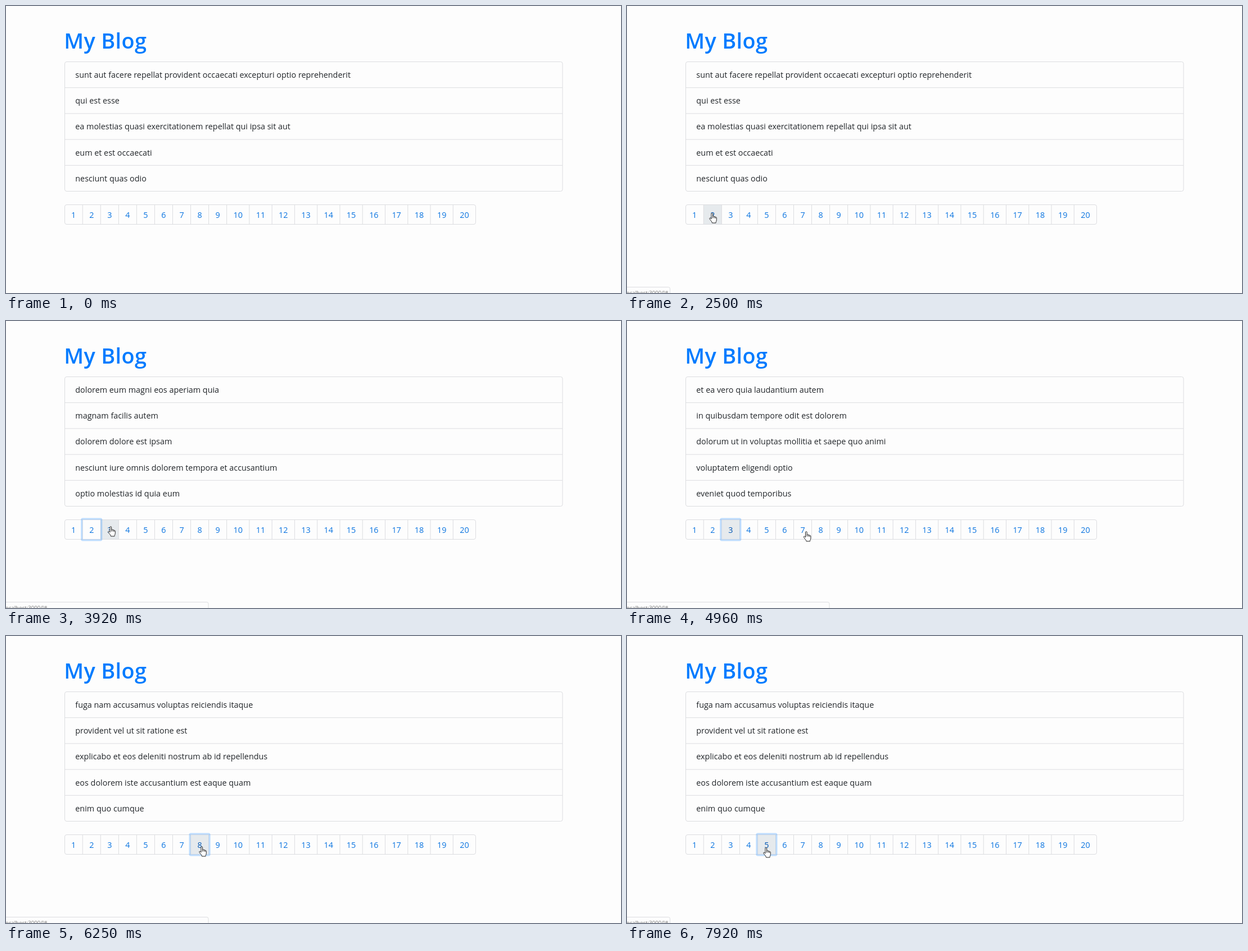
An HTML page for the animation above (8000 ms loop, 1094 px wide and 512 px high).

```html
<!DOCTYPE html>
<html lang="en">
<head>
<meta charset="utf-8">
<title>My Blog</title>
<style>
  html, body { margin: 0; height: 100%; overflow: hidden; background: #fdfdfd; }
  svg { display: block; width: 100vw; height: 100vh; }
  text { font: 14.37px "Open Sans", "Noto Sans", sans-serif; fill: #212529; }
  .title { font-size: 37.8px; font-weight: 600; letter-spacing: .35px; fill: #007bff; }
  .line { fill: none; stroke: #dcdde0; }
  .num { text-anchor: middle; fill: #0a74e0; }
  .num.on { fill: #0056b3; }
  #hover { fill: #e6eaed; }
  #ring { fill: none; stroke: #007bff; stroke-opacity: .25; stroke-width: 3; }
  #status rect { fill: #fdfdfd; stroke: #dcdde0; }
  #status text { font-size: 9.6px; text-anchor: end; fill: #777; }
  #cursor path { fill: #fff; stroke: #222; stroke-linejoin: round; }
</style>
</head>
<body>
<svg viewBox="0 0 1094 512">
  <text class="title" x="103.3" y="76">My Blog</text>
  <rect class="line" x="104.5" y="99.5" width="885.5" height="231" rx="3.5"/>
  <g id="list"></g>
  <rect id="hover" y="355" height="34.5"/>
  <rect class="line" x="104.5" y="354.5" width="731" height="35" rx="3.5"/>
  <g id="pager"></g>
  <rect id="ring" y="353" height="38" rx="1.5"/>
  <g id="status">
    <rect x="-5" y="501.5" height="20" rx="3"/>
    <text x="73.5" y="514.5">localhost:3000/!#</text>
  </g>
  <g id="cursor">
    <path id="hand" d="M4 11V1.8C4 .2 6.6 .2 6.6 1.8V6.5C7 5.4 9 5.6 9.1 6.8C9.6 6.2 11.2 6.5 11.3 7.6C12 7.2 13.3 7.6 13.3 8.8V12.5C13.3 15 12 15.6 12 18H5.5C5.3 15.5 3 14 1.2 11.2C0 9.4 1.8 8.4 2.8 9.6ZM6.6 6.5V9.5M9.1 6.8V9.5M11.3 7.6V10"/>
    <path id="arrow" d="M5 0V14.5L8.3 11.5 10.5 16.5 12.6 15.5 10.4 10.8H15Z"/>
  </g>
</svg>
<script>
const LOOP = 8000, HOVER_LAG = 60, CELLS = 20;

const pages = {
  1: ["sunt aut facere repellat provident occaecati excepturi optio reprehenderit", "qui est esse",
      "ea molestias quasi exercitationem repellat qui ipsa sit aut", "eum et est occaecati", "nesciunt quas odio"],
  2: ["dolorem eum magni eos aperiam quia", "magnam facilis autem", "dolorem dolore est ipsam",
      "nesciunt iure omnis dolorem tempora et accusantium", "optio molestias id quia eum"],
  3: ["et ea vero quia laudantium autem", "in quibusdam tempore odit est dolorem",
      "dolorum ut in voluptas mollitia et saepe quo animi", "voluptatem eligendi optio", "eveniet quod temporibus"],
  8: ["fuga nam accusamus voluptas reiciendis itaque", "provident vel ut sit ratione est",
      "explicabo et eos deleniti nostrum ab id repellendus", "eos dolorem iste accusantium est eaque quam", "enim quo cumque"]
};

// [time, value]
const shownPage = [[0, 1], [3000, 2], [4590, 3], [6130, 8]];
const focused = [[0, 0], [2840, 2], [4540, 3], [6040, 8], [7830, 5]];

// [time, x, y]
const path = [
  [0, 205, 520], [880, 205, 520], [1300, 150, 368], [1420, 148, 367], [1670, 146, 369],
  [3750, 146, 369], [3880, 181, 366], [4900, 181, 366], [4960, 313.5, 375], [5540, 320, 374],
  [5670, 341, 373], [6000, 341, 373], [6200, 343, 375], [6670, 343, 375], [6900, 322, 402],
  [7150, 262, 400], [7340, 243, 378], [7790, 243, 378], [7900, 242, 377], [LOOP, 242, 377]
];

const $ = id => document.getElementById(id);

function add(parent, tag, attrs) {
  const el = document.createElementNS("http://www.w3.org/2000/svg", tag);
  return parent.appendChild(set(el, attrs));
}

function set(el, attrs) {
  for (const key in attrs) el.setAttribute(key, attrs[key]);
  return el;
}

const ramp = (t, from, to) => Math.min(1, Math.max(0, (t - from) / (to - from)));
const valueAt = (steps, t) => steps.filter(s => s[0] <= t).pop()[1];
const edge = i => i < 9 ? 104.2 + 32.05 * i : 392.6 + 40.27 * (i - 9);

function cursorAt(t) {
  const i = Math.max(1, path.findIndex(p => p[0] > t));
  const [t0, x0, y0] = path[i - 1], [t1, x1, y1] = path[i];
  const k = ramp(t, t0, t1);
  return [x0 + (x1 - x0) * k, y0 + (y1 - y0) * k];
}

function cellAt([x, y]) {
  if (y < 354 || y > 390) return 0;
  for (let n = 1; n <= CELLS; n++)
    if (x + 5 >= edge(n - 1) && x + 5 < edge(n)) return n;
  return 0;
}

function placeBox(el, n, grow) {
  el.style.display = n ? "" : "none";
  if (n) set(el, { x: edge(n - 1) - grow, width: edge(n) - edge(n - 1) + 2 * grow });
}

const rows = [0, 1, 2, 3, 4].map(i => {
  if (i) add($("list"), "path", { class: "line", d: `M104.5 ${99.5 + 46.2 * i}H990` });
  return add($("list"), "text", { x: 123.3, y: Math.floor(128.1 + 46.3 * i) });
});

const numbers = [];
for (let n = 1; n <= CELLS; n++) {
  if (n > 1) add($("pager"), "path", { class: "line", d: `M${edge(n - 1)} 355V389` });
  numbers[n] = add($("pager"), "text", { class: "num", x: (edge(n - 1) + edge(n)) / 2, y: 378 });
  numbers[n].textContent = n;
}

function draw(t) {
  const lines = pages[valueAt(shownPage, t)];
  rows.forEach((row, i) => {
    if (row.textContent !== lines[i]) row.textContent = lines[i];
  });

  const hovered = cellAt(cursorAt(Math.max(0, t - HOVER_LAG)));
  placeBox($("hover"), hovered, 0);
  placeBox($("ring"), valueAt(focused, t), 1.5);
  numbers.forEach((el, n) => el.classList.toggle("on", n === hovered));

  const [x, y] = cursorAt(t);
  set($("cursor"), { transform: `translate(${x} ${y})` });
  $("hand").style.display = hovered ? "" : "none";
  $("arrow").style.display = hovered ? "none" : "";

  // The link bubble widens after a long hover and is narrow again when it returns.
  const returned = t > 7100;
  const alpha = returned ? ramp(t, 7260, 7380) : ramp(t, 1380, 1500) - ramp(t, 6900, 7020);
  set($("status"), { opacity: alpha });
  set($("status").firstElementChild, { width: 81.5 + (returned ? 0 : 283.5 * ramp(t, 3000, 3090)) });
}

function frame(now) {
  draw(now % LOOP);
  requestAnimationFrame(frame);
}
draw(0);
requestAnimationFrame(frame);
</script>
</body>
</html>
```
